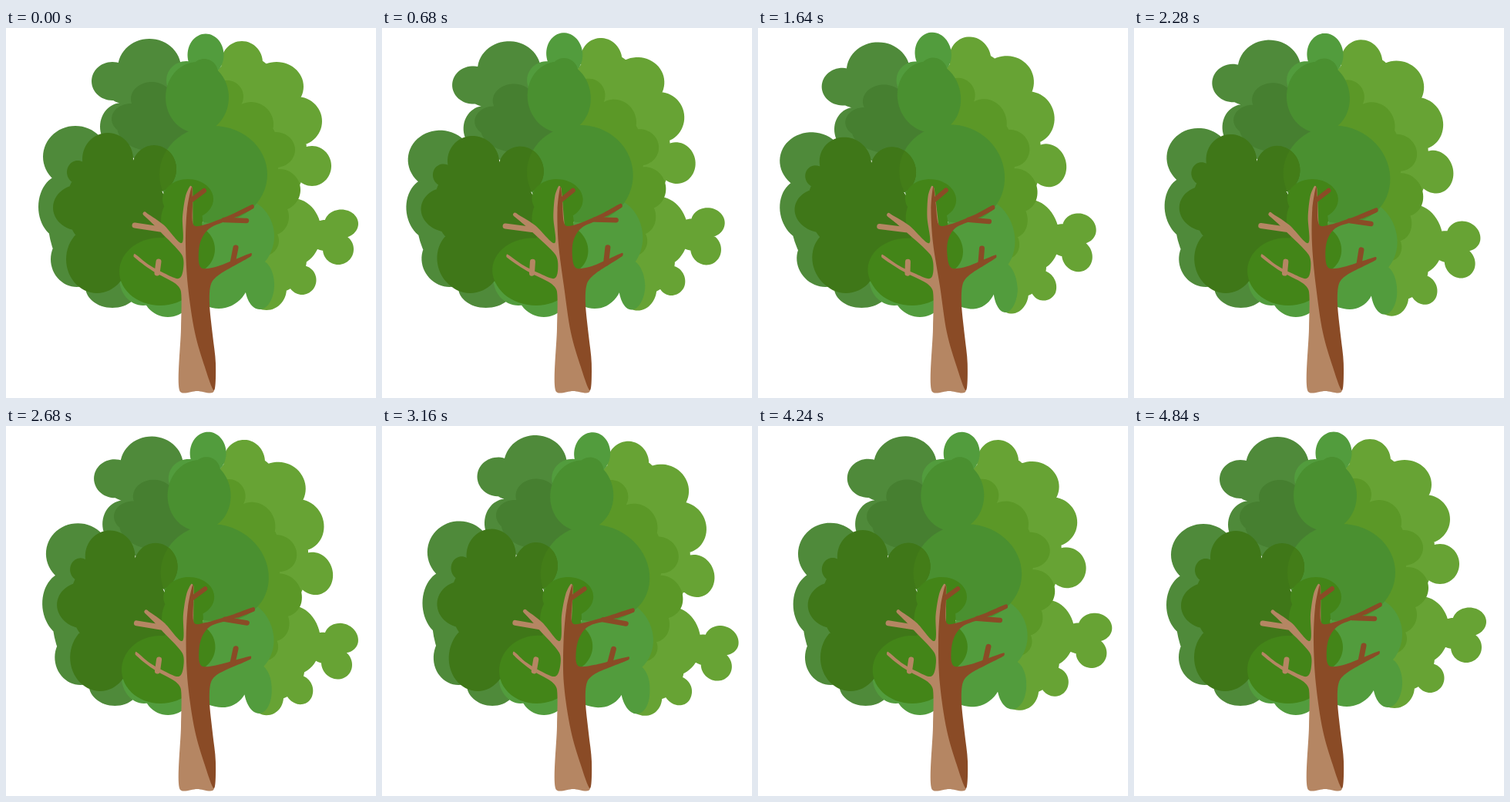
Recreate the animation shown at these times as an HTML page with a canvas. Size 480 by 480 pixels, loop 4.96 s.

```html
<!DOCTYPE html>
<html lang="en">
<head>
<meta charset="utf-8">
<title>Swaying tree</title>
<style>
html, body { margin: 0; width: 100%; height: 100%; overflow: hidden; background: #fff; }
canvas { display: block; width: 480px; height: 480px; }
</style>
</head>
<body>
<canvas id="stage" width="480" height="480"></canvas>
<script>
const ctx = document.getElementById('stage').getContext('2d');
const LOOP = 4960, STEP = 40, LAST = 4840;

// Ellipses as [cx, cy, rx, ry]
const crown = {
  topLeft: [[186, 52, 41, 38], [138, 69, 27, 25], [160, 84, 28, 15], [150, 128, 28, 31],
    [188, 105, 42, 45], [190, 145, 40, 30]],
  topLeftShade: [[189, 92, 27, 22], [162, 118, 25, 20], [192, 128, 48, 32]],
  left: [[90, 167, 42, 40], [74, 232, 32, 42], [92, 300, 34, 36], [138, 336, 35, 27],
    [122, 245, 68, 95]],
  right: [[306, 45, 27, 28], [351, 76, 35, 32], [377, 121, 33, 32], [397, 179, 25, 26],
    [310, 110, 52, 75], [336, 160, 54, 80], [372, 265, 37, 44], [435, 254, 22, 18.5],
    [431, 287, 20, 20], [414, 269, 22, 20], [384, 327, 18.5, 19], [345, 300, 45, 45],
    [338, 338, 26, 28]],
  rightShade: [[257, 58, 18, 18], [287, 89, 21, 21], [318, 125, 29, 29], [350, 158, 25, 23],
    [355, 210, 27, 27], [345, 245, 22, 24], [333, 276, 21, 20], [305, 165, 50, 62],
    [318, 240, 38, 50]],
  middle: [[259, 35, 23.5, 27.5], [234, 68, 26, 25], [300, 270, 48, 50], [276, 320, 41, 44],
    [329, 333, 19, 32], [210, 340, 34, 35], [178, 325, 31, 35]],
  middleShade: [[257, 58, 18, 18], [248, 90, 41, 46], [269, 190, 70, 63]],
  leftShade: [[132, 170, 33, 34], [192, 183, 29, 31], [93, 187, 14, 15], [96, 233, 35, 30],
    [118, 300, 40, 44], [130, 230, 52, 60], [160, 255, 52, 75]],
  front: [[236, 222, 33, 26], [228, 250, 27, 35], [236, 287, 35, 33], [200, 316, 53, 44]]
};

const trunk = [[239, 205], [233, 218], [229, 245], [228, 279], [204, 255], [180, 239], [180, 243],
  [200, 264], [228, 294], [230, 312], [224, 325], [205, 318], [185, 307], [167, 293], [166, 297],
  [190, 315], [219, 331], [227, 342], [227, 390], [225, 470], [248, 471], [270, 470],
  [258, 380], [244, 290], [242, 208]];
const bark = [[241, 206], [242, 225], [243, 255], [258, 255], [290, 243], [320, 229], [321, 234],
  [292, 248], [264, 260], [252, 278], [250, 303], [255, 312], [275, 309], [318, 292], [318, 296],
  [278, 319], [266, 332], [264, 358], [268, 398], [272, 435], [270, 470], [258, 440],
  [245, 395], [236, 335], [233, 280], [235, 235]];
const twigs = [
  ['#b58663', 7, 167, 256, 200, 261], ['#b58663', 7, 198, 303, 196, 318],
  ['#b58663', 5, 180, 241, 190, 250],
  ['#8a4b26', 6, 241, 223, 257, 211], ['#8a4b26', 6.5, 283, 249, 312, 250],
  ['#8a4b26', 7, 298, 285, 294, 305], ['#8a4b26', 5, 319, 232, 300, 242]
];

// Cosine easing through [time, value] keys
function ease(t, keys) {
  let [t0, v0] = keys[0];
  for (const [t1, v1] of keys) {
    if (t <= t1) {
      if (t1 === t0) return v1;
      return v0 + (v1 - v0) * (1 - Math.cos(Math.PI * (t - t0) / (t1 - t0))) / 2;
    }
    t0 = t1;
    v0 = v1;
  }
  return v0;
}

const swayKeys = [[0, 0], [1200, -1.15], [3360, 0.46], [LAST, 0]];
const sagKeys = [[0, 0], [200, 0], [3200, 1.05], [LAST, 0]];
let sway = 0, sag = 0;

// Bend the tree above its fork; the right side also sags with a delay
function warp(x, y) {
  const d = x - 239, lift = Math.max(0, 335 - y);
  const far = 1 - Math.exp(-((Math.max(0, Math.abs(d) - 25) / 75) ** 2));
  const low = Math.min(1, y / 255);
  const side = far * Math.max(0, y - 60) * (d > 0 ? 0.046 : 0.026);
  const pull = d > 0 ? -6 * Math.min(1, Math.max(0, (y - 220) / 110)) : 4.5 * low * low;
  return [
    x + sway * (lift * 0.107 + side) + sag * far * pull,
    y + sway * d * lift * 0.00027 + sag * 22 * Math.max(0, x - 270) / 163 * low
  ];
}

function cluster(ellipses) {
  const path = new Path2D();
  for (const [cx, cy, rx, ry] of ellipses) {
    for (let i = 0; i < 60; i++) {
      const a = i * Math.PI / 30;
      const p = warp(cx + rx * Math.cos(a), cy + ry * Math.sin(a));
      i ? path.lineTo(...p) : path.moveTo(...p);
    }
    path.closePath();
  }
  return path;
}

// Closed Catmull-Rom curve through warped points
function curve(points) {
  const p = points.map(q => warp(...q)), n = p.length, path = new Path2D();
  path.moveTo(...p[0]);
  for (let i = 0; i < n; i++) {
    const a = p[(i + n - 1) % n], b = p[i], c = p[(i + 1) % n], e = p[(i + 2) % n];
    const k = Math.hypot(c[0] - b[0], c[1] - b[1]);
    const before = Math.min(1 / 6, k / (3 * Math.hypot(c[0] - a[0], c[1] - a[1]) + 0.01));
    const after = Math.min(1 / 6, k / (3 * Math.hypot(e[0] - b[0], e[1] - b[1]) + 0.01));
    path.bezierCurveTo(
      b[0] + (c[0] - a[0]) * before, b[1] + (c[1] - a[1]) * before,
      c[0] - (e[0] - b[0]) * after, c[1] - (e[1] - b[1]) * after, c[0], c[1]);
  }
  path.closePath();
  return path;
}

function fill(path, color) {
  ctx.fillStyle = color;
  ctx.fill(path);
}

function draw(t) {
  sway = ease(t, swayKeys);
  sag = ease(t, sagKeys);
  ctx.fillStyle = '#fff';
  ctx.fillRect(0, 0, 480, 480);

  fill(cluster(crown.topLeft), '#4f8a3a');
  fill(cluster(crown.topLeftShade), '#467f30');
  fill(cluster(crown.left), '#4f8a3a');
  fill(cluster(crown.right), '#67a334');
  fill(cluster(crown.rightShade), '#5b9827');
  fill(cluster(crown.middle), '#529c3d');
  const middle = cluster(crown.middleShade), shade = cluster(crown.leftShade);
  fill(middle, '#4a9030');
  fill(shade, '#3f7718');
  ctx.save();
  ctx.clip(shade);
  fill(middle, '#437d18');
  ctx.restore();
  fill(cluster(crown.front), '#438518');

  fill(curve(trunk), '#b58663');
  fill(curve(bark), '#8a4b26');
  ctx.lineCap = 'round';
  for (const [color, width, x0, y0, x1, y1] of twigs) {
    ctx.strokeStyle = color;
    ctx.lineWidth = width;
    ctx.beginPath();
    ctx.moveTo(...warp(x0, y0));
    ctx.lineTo(...warp(x1, y1));
    ctx.stroke();
  }
}

const start = performance.now();
function tick() {
  const t = (performance.now() - start) % LOOP;
  draw(Math.min(LAST, Math.floor(t / STEP) * STEP));
  requestAnimationFrame(tick);
}
tick();
</script>
</body>
</html>
```
